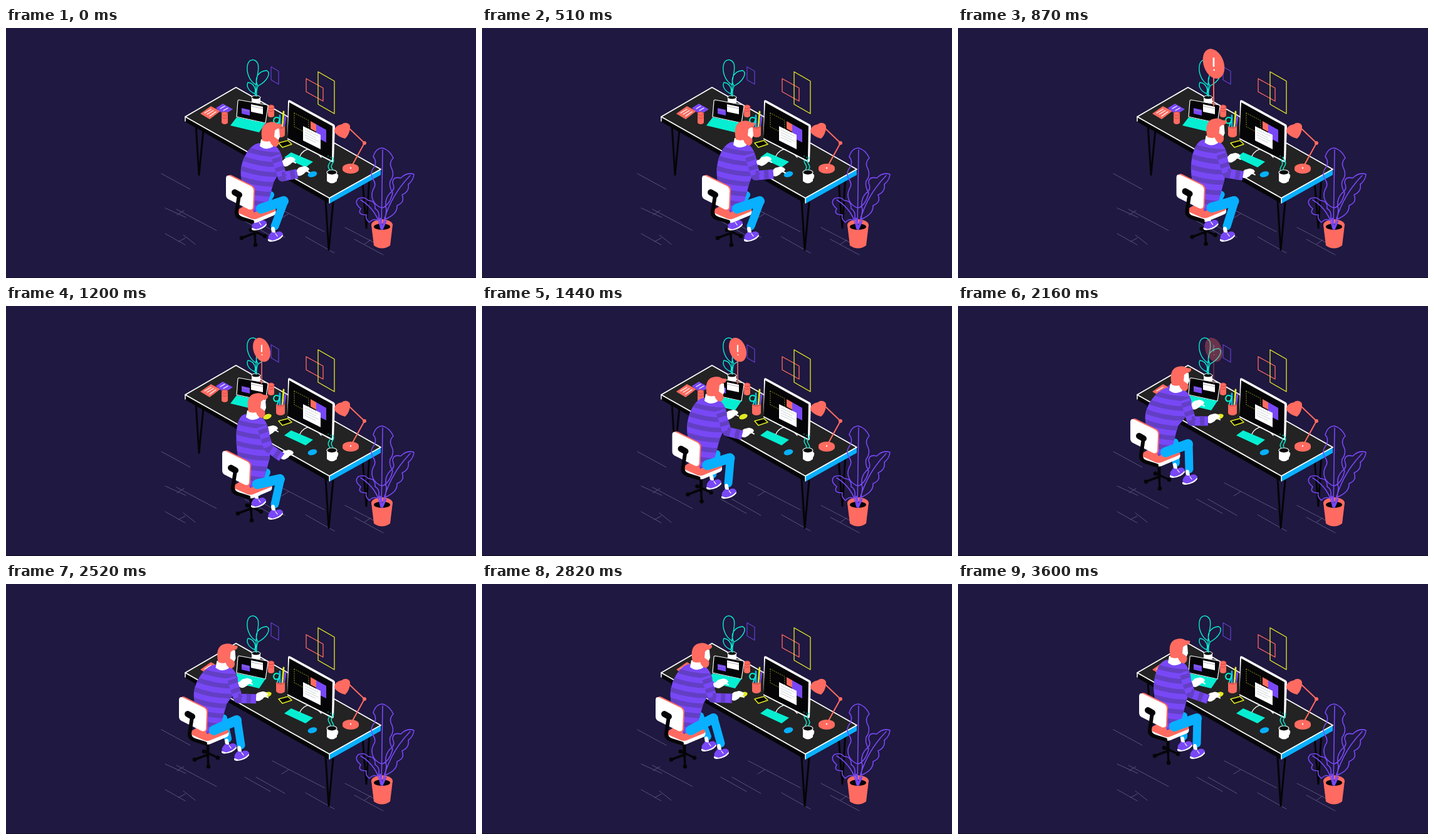
These frames come from a looping animation (750x400 px, 3630 ms). An HTML page:

```html
<!DOCTYPE html>
<html lang="en">
<head>
<meta charset="utf-8">
<title>Desk work</title>
<style>
  html, body { margin: 0; width: 100%; height: 100%; overflow: hidden; background: #1f1840; }
  svg { display: block; width: 100vw; height: 100vh; fill: none; stroke-linecap: round; stroke-linejoin: round; }
  .coral { fill: #ff6b60 } .cyan { fill: #06eed2 } .purple { fill: #7848f6 } .blue { fill: #08b0ff }
  .yellow { fill: #e2ea22 } .white { fill: #fff } .black { fill: #050507 } .top { fill: #232323 }
  .s-coral { stroke: #ff6b60 } .s-cyan { stroke: #06eed2 } .s-purple { stroke: #7848f6 } .s-blue { stroke: #08b0ff }
  .s-yellow { stroke: #e2ea22 } .s-white { stroke: #fff } .s-black { stroke: #050507 } .s-stripe { stroke: #633fc4 }
</style>
</head>
<body>
<svg viewBox="0 0 750 400">
  <path stroke="#5a527e" d="M248 233l46 25M254 288l33 15M272 290l64 34M273 299l11-7M254 329l32 18M283 331l19 15M275 342l11-6
    M425 283l83 43M440 304l11-7M381 309l41 23M399 309l46 26M478 334l46 26M541 319l61 32M556 338l46 25M572 346l10-7"/>

  <g stroke-width="1.3">
    <path class="s-purple" opacity=".75" d="M423 62l12 7v21l-12-7z"/>
    <path class="s-coral" d="M479 81l27 15v21l-27-15z"/>
    <path class="s-yellow" d="M498 70l26 15v52l-26-15z"/>
  </g>

  <!-- desk -->
  <path class="s-black" stroke-width="3" d="M303 155l5 80 7-72M510 276l5 79 7-76M569 246l6 74 5-82"/>
  <path class="black" d="M286 142l230 130v9L286 150z"/>
  <path class="blue" d="M516 272l82-46v9l-82 46z"/>
  <path class="top s-white" stroke-width="1.8" d="M367 95l231 131-82 46-230-130z"/>
  <path class="s-white" stroke-width="1.5" d="M286 142v7M516 272v8"/>

  <!-- papers and cans -->
  <path class="coral" d="M310 137l17-12 15 8-17 13z"/>
  <path class="purple" d="M335 128l11-7 16 9-14 9z"/>
  <path stroke="#fff" stroke-width="1.2" d="M317 136l10-6M321 138l10-6M325 141l10-7M342 129l7-4M347 132l7-4"/>
  <g id="can">
    <path class="coral" d="M344 137v14a5 3 0 0 0 10 0v-14z"/>
    <ellipse cx="349" cy="137" rx="5" ry="3" class="coral" stroke="#c23f3f" stroke-width=".8"/>
    <path stroke="#c23f3f" stroke-width=".8" d="M345 143q4 3 8 0"/>
  </g>
  <use href="#can" x="74" y="-11"/>

  <!-- small plant -->
  <path class="white" d="M392 111v9q7 5 14 0v-9z"/>
  <ellipse cx="399" cy="111" rx="7" ry="3" class="black s-white"/>
  <path class="s-cyan" stroke-width="1.4" d="M399 91C387 84 384 70 385 61C387 49 397 48 402 57C405 68 399 80 399 91V109
    M402 93C395 80 403 69 416 68C423 72 418 84 402 93Q399 100 400 109M397 105C387 101 383 93 386 87C394 88 400 96 397 105L399 109"/>

  <!-- laptop -->
  <path class="black s-white" stroke-width="1.2" d="M372 115l44 8q2 0 2 3l-4 26-46-10 2-25q0-2 2-2z"/>
  <path class="cyan" d="M368 143l46 9-10 15-46-11z"/>
  <path class="purple" d="M376 128l13 3v9l-13-3z"/>
  <path class="white" d="M391 122l19 4v12l-19-4z"/>
  <path stroke="#999" stroke-width=".7" d="M391 125l19 4M377 131l11 2"/>

  <!-- cup of pencils -->
  <path stroke-width="2.8" class="s-yellow" d="M443 134l-2 25"/>
  <path stroke-width="2.8" class="s-purple" d="M446 142l-3 17"/>
  <path stroke-width="2.8" class="s-blue" d="M437 140v19"/>
  <path stroke-width="2" class="s-cyan" d="M433 157l4-12M436 151q-8 4-9-3 1-7 8-4"/>
  <path class="coral" d="M431 157v14a7 4 0 0 0 14 0v-14q-7 3-14 0z"/>
  <path stroke="#c23f3f" d="M431 157a7 3 0 0 0 14 0"/>

  <!-- phone, mice, keyboard -->
  <path class="black s-yellow" stroke-width="1.6" d="M435 184l15-4 6 6-15 5z"/>
  <ellipse class="yellow" cx="417" cy="177" rx="7" ry="4" transform="rotate(-20 417 177)"/>
  <path class="cyan" d="M444 207l11-8 35 15-12 9z"/>
  <ellipse class="blue" cx="489" cy="234" rx="7.5" ry="4.5" transform="rotate(-15 489 234)"/>

  <!-- monitor -->
  <path class="s-white" stroke-width="1.3" d="M487 189v4Q474 194 469 205M488 193Q496 199 503 207"/>
  <path class="white" d="M450 118q0-4 4-2l69 38q2 1 2 4l-2 54q0 4-4 2l-70-36z"/>
  <path class="black" d="M452 119l69 38-1 55-71-36z"/>
  <path class="s-yellow" stroke-width=".7" stroke-dasharray="1 2.5" d="M460 136l23 12v22l-23-12z"/>
  <path class="coral" d="M486 149l9 5v12l-9-5z"/>
  <path class="purple" d="M495 154l16 9v20l-16-8z"/>
  <path class="white" d="M474 157l28 14v23l-28-14z"/>
  <path stroke="#b4bfc4" stroke-width=".7" d="M477 163l21 10M477 167l18 9M477 171l21 10M477 175l17 8"/>
  <path class="s-cyan" stroke-width="1.5" d="M514 205h.1M518 207h.1"/>

  <!-- lamp -->
  <path class="coral" d="M537 224a13 7 0 0 1 26 0v2a13 7 0 0 1-26 0z"/>
  <path class="s-coral" stroke-width="2" d="M550 224l22-40-24-23"/>
  <circle class="coral" cx="572" cy="184" r="3"/>
  <path class="coral" d="M524 166q0-10 12-12 3-3 8-2 6 2 5 8-1 11-8 17-12-3-17-11z"/>
  <circle class="white" cx="550" cy="224" r="1.2"/>

  <!-- mug -->
  <path class="s-white" stroke-width="2" d="M527 234q4 1 1 7l-3 2"/>
  <path class="white" d="M512 231v14q8 7 16 0v-14z"/>
  <ellipse class="black s-white" stroke-width="1.2" cx="520" cy="231" rx="8" ry="4"/>
  <path id="steam" class="s-cyan" stroke-width="1.5"/>

  <!-- large plant -->
  <path class="coral" d="M583 315l4 33q13 9 26 0l4-33z"/>
  <ellipse class="coral" cx="600" cy="315" rx="17" ry="9"/>
  <ellipse class="black" cx="600" cy="318" rx="13" ry="5"/>
  <path class="s-purple" stroke-width="1.6" d="M599 321L601 195M600 288C588 284 580 272 586 258Q592 250 585 241Q580 231 588 222Q592 213 586 206Q590 192 601 192Q612 195 618 208Q610 216 616 226Q620 236 613 245Q611 254 617 264Q612 284 600 288
    M600 321Q610 272 645 236M607 291Q603 274 613 264Q622 258 617 248Q617 237 630 240Q640 230 651 234Q650 244 642 250Q644 262 632 267Q637 279 624 284Q625 298 605 306L607 291
    M598 321Q592 291 566 275M594 308Q586 304 580 311Q573 306 575 299Q560 299 566 289Q555 280 562 273Q572 269 578 276Q590 276 589 289Q598 294 594 308"/>
  <path class="s-purple" stroke-width="3" d="M600 322L597 305M600 322l6-13"/>

  <g id="sign">
    <path class="s-coral" stroke-width="1.6" d="M408 85v39"/>
    <ellipse class="coral" cx="408" cy="70" rx="13" ry="20" transform="rotate(-20 408 70)"/>
    <path class="s-white" stroke-width="2.2" d="M408 63v10M408.500 78v.1"/>
  </g>
  <g id="person"></g>
  <path stroke="#120d28" d="M0 399.500h750"/>
</svg>
<script>
const LOOP = 3630;
const el = id => document.getElementById(id);
const clamp = v => Math.min(1, Math.max(0, v));
const progress = (t, from, to) => clamp((t - from) / (to - from));
const smooth = u => u * u * (3 - 2 * u);
const outBack = u => 1 + 3.9 * (u - 1) ** 3 + 2.9 * (u - 1) ** 2;

// Each pose: chair, head, right hand, left hand, right foot, left foot
const typing = [351, 236, 419, 168, 474, 229, 452, 214, 430, 333, 404, 315];
const leaning = [...typing]; leaning[2] = 423; leaning[3] = 170;
const pushing = [345, 232, 401, 159, 449, 238, 424, 199, 430, 333, 403, 314];
const arrived = [277, 182, 355, 116, 408, 180, 383, 158, 371, 278, 349, 266];
const settled = [275, 181, 355, 116, 408, 180, 383, 158, 370, 277, 350, 266];
const stepped = [277, 181, 350, 114, 408, 180, 383, 158, 382, 271, 362, 259];
const pulledIn = [289, 175, 353, 107, 408, 180, 384, 158, 382, 271, 362, 259];
const keys = [[0, leaning], [60, leaning], [420, typing], [660, typing], [1140, pushing], [1200, pushing],
  [1620, arrived], [1740, arrived], [2100, settled], [2280, settled], [2760, stepped], [2820, stepped], [3270, pulledIn], [LOOP, pulledIn]];

function poseAt(t) {
  const i = keys.findIndex(k => k[0] > t);
  const [t0, a] = keys[i - 1], [t1, b] = keys[i];
  const u = smooth(progress(t, t0, t1));
  const v = a.map((n, j) => n + (b[j] - n) * u);
  return [0, 2, 4, 6, 8, 10].map(j => [v[j], v[j + 1]]);
}

const add = ([x, y], dx, dy) => [x + dx, y + dy];
const at = ([x, y], body) => `<g transform="translate(${x} ${y})">${body}</g>`;
const line = (cls, width, points, extra = '') =>
  `<path class="s-${cls}" stroke-width="${width}" ${extra} d="M${points.join('L')}"/>`;
const shape = (cls, d) => `<path class="${cls}" d="${d}"/>`;

const chairStand = line('black', 3.5, [[46, 92], [25, 100]]) + line('black', 3.5, [[46, 92], [47, 111]]) +
  line('black', 3.5, [[41, 87], [62, 97]]) + line('black', 5, [[46, 70], [46, 94]]) +
  [[25, 100], [47, 111], [62, 97], [40, 87]].map(([x, y]) => `<circle class="black" cx="${x}" cy="${y}" r="3.3"/>`).join('');
const chairSeat = shape('white', 'M20 56L79 55Q81 62 76 64L50 75Q46 77 40 74L21 65Z') +
  shape('coral', 'M20 54Q38 42 56 46L77 52Q82 55 77 58L50 69Q46 71 40 69L20 60Z');
const chairBack = shape('coral', 'M3 3Q4 -3 10 0L42 16Q47 19 46 26L45 52Q44 57 38 54Z') +
  shape('white', 'M0 5Q0 -2 7 1L40 17Q45 20 44 27L43 51Q42 56 36 54L4 38Q0 36 0 31Z') +
  line('black', 10, [[14, 27], [21, 31]]) +
  '<path class="s-black" stroke-width="6" d="M21 31L17 58Q16 66 26 69L42 74"/>';
const shoe = line('white', 6, [[-4, -12], [-3, -6]]) +
  shape('white', 'M-12 5Q-13 9 -7 9Q6 8 12 0L11 -5Z') +
  shape('purple', 'M-11 5C-13 -1 -8 -4 -6 -7Q-2 -4 3 -7Q10 -9 12 -3Q6 5 -5 7Z') +
  line('white', 1.2, [[0, -4], [3, 0]]);
const hand = shape('white', 'M-11 5Q-12 -2 -6 -6L2 -8Q9 -7 10 -3L7 1Q3 1 2 4L-3 7Q-8 9 -11 5Z') +
  line('white', 2, [[1, -3], [10, 2]]);
const head = shape('white', 'M-16 8L4 8L3 20Q-8 27 -18 19Z') +
  shape('white', 'M2 -10L13 -9L14 4L11 11L2 12Z') +
  shape('coral', 'M-14 10C-17 -5 -15 -14 -7 -18Q4 -22 10 -17L17 -16Q18 -10 10 -9L6 -6L5 4L12 9Q14 17 8 20Q1 20 -2 11Q-8 13 -14 10Z');

function drawPerson(t) {
  const [chair, face, right, left, footR, footL] = poseAt(t);
  const tap = t < 600 || t > 2220 ? Math.sin(t / 38) : 0;
  const neck = add(face, -8, 15), hip = add(chair, 48, 44);
  const handR = add(right, 0, tap), handL = add(left, 0, -1.3 * tap);
  const kneeR = [chair[0] + 92, footR[1] - 56], kneeL = [chair[0] + 71, footL[1] - 48];
  const arm = [add(neck, 15, 19), add(neck, 26, 53), add(handR, -9, 4)];
  const n = (x, y) => add(neck, x, y), h = (x, y) => add(hip, x, y);
  const torso = `M${n(-10, -1)}C${n(-27, 0)} ${h(-27, -66)} ${h(-24, -42)}L${h(-20, -18)}L${h(-3, 15)}` +
    `L${h(18, 4)}L${h(28, -33)}Q${n(30, 32)} ${n(25, 20)}Q${n(20, 3)} ${n(6, 0)}Q${n(-2, 4)} ${n(-10, -1)}Z`;
  let stripes = '';
  for (let k = 0; k < 7; k++) {
    const u = (k + .9) / 6;
    const x = neck[0] + (hip[0] - neck[0]) * u, y = neck[1] + (hip[1] - neck[1]) * u;
    stripes += `M${x - 36} ${y - 8}q36 14 72 11`;
  }
  el('person').innerHTML =
    at(chair, chairStand) +
    line('blue', 12, [h(10, 0), kneeL, add(footL, -2, -15)]) + at(footL, shoe) +
    at(chair, chairSeat) +
    line('purple', 11, [n(12, 22), add(handL, -15, 3)]) + line('white', 8, [add(handL, -10, 2), handL]) + at(handL, hand) +
    `<clipPath id="torso"><path d="${torso}"/></clipPath>` + shape('purple', torso) +
    `<path clip-path="url(#torso)" class="s-stripe" stroke-width="7.500" d="${stripes}"/>` +
    line('blue', 16, [h(8, 9), kneeR]) + line('blue', 13, [add(kneeR, 1, 0), add(footR, -1, -16)]) + at(footR, shoe) +
    at(handR, hand) + line('purple', 15, arm, 'stroke-linecap="butt"') +
    line('stripe', 15, arm, 'stroke-linecap="butt" stroke-dasharray="7 8" stroke-dashoffset="-4"') +
    at(face, head) + at(chair, chairBack);
}

function drawSteam(t) {
  const wave = (x, top) => {
    const points = [];
    for (let y = 227; y >= top; y -= 2) points.push([x + 1.8 * Math.sin(y / 3 + t / 180), y]);
    return 'M' + points.join('L');
  };
  el('steam').setAttribute('d', wave(516, 211) + wave(521, 207));
}

function drawSign(t) {
  const scale = t < 640 ? 0 : outBack(progress(t, 640, 1080));
  el('sign').setAttribute('transform', `translate(408 124) scale(${scale}) translate(-408 -124)`);
  el('sign').setAttribute('opacity', 1 - progress(t, 2040, 2220));
}

function frame() {
  const t = performance.now() % LOOP;
  drawPerson(t);
  drawSteam(t);
  drawSign(t);
  requestAnimationFrame(frame);
}
frame();
</script>
</body>
</html>
```
